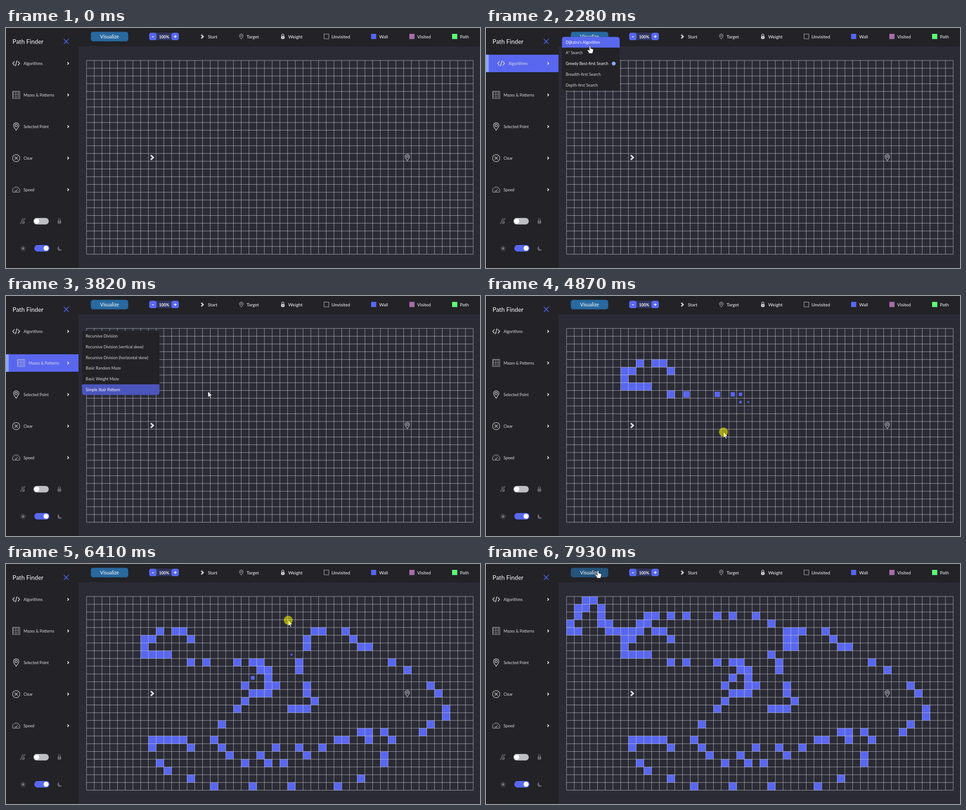
These frames come from a looping animation (1053 px wide and 532 px high, 8000 ms). An HTML page:

```html
<!DOCTYPE html>
<html lang="en">
<head>
<meta charset="utf-8">
<title>Path Finder</title>
<style>
  html, body { margin: 0; width: 100%; height: 100%; overflow: hidden; background: #2b2b36; }
  svg { display: block; width: 1053px; height: 532px; }
  text { font-family: Lato, sans-serif; font-size: 8.89px; fill: #dededf; }
  .title { font-size: 13.6px; fill: #fff; }
  .legend { font-size: 10px; fill: #fff; }
  .btn { font-size: 10.9px; fill: #fff; text-anchor: middle; }
  .zoom { font-weight: 700; fill: #fff; text-anchor: middle; }
  .line { fill: none; stroke: #d0d0d3; stroke-width: 1.25; }
  .dim { color: #6b6b72; }
  .blue { fill: #5967ef; }
  .panel { fill: #222227; }
</style>
</head>
<body>
<svg viewBox="0 0 1053 532">
  <defs>
    <path id="chev" d="M-1.6-2.8 1.3 0-1.6 2.8" fill="none" stroke="#e8e8ea" stroke-width="1.8"/>
    <g id="pin" class="line">
      <path d="M0 8.3C-1.6 4.6-6 1.6-6-2.4a6 6 0 0 1 12 0C6 1.6 1.6 4.6 0 8.3z"/>
      <circle cy="-2.4" r="2.7"/>
    </g>
    <g id="code" class="line" style="stroke-width:1.6">
      <path d="M-3.6-4.6-7.7 0l4.1 4.6M3.6-4.6 7.7 0 3.6 4.6M1.7-6.3-1.7 6.3"/>
    </g>
    <g id="maze" class="line" style="stroke-width:.8">
      <path d="M-8-8H8V8H-8z"/>
      <path d="M-8-5H8M-8-2H8M-8 1H8M-8 4.5H8" stroke-dasharray="3.4 2.1"/>
      <path d="M-5-8V8M-2-8V8M1.5-8V8M5-8V8" stroke-dasharray="2.3 3.4"/>
    </g>
    <g id="clear" class="line" style="stroke-width:1.15">
      <circle r="8"/><path d="M-3.4-3.4 3.4 3.4M3.4-3.4-3.4 3.4"/>
    </g>
    <g id="speed" class="line" style="stroke-width:.9">
      <path d="M-7.4 5.5A8.2 8.2 0 1 1 7.4 5.5zM-1 3.4 4-2M-5.5 1.8h1.4M-3.8-2.2l.9.9M0-4v1.3M4 1.8h1.5"/>
      <circle cx="-.6" cy="3" r="1"/>
    </g>
    <g id="lock" fill="currentColor">
      <rect x="-4" y="-1.3" width="8" height="7" rx="2.6"/>
      <path d="M-2.5-1v-1.8a2.5 2.5 0 0 1 5 0V-1" fill="none" stroke="currentColor" stroke-width="1.2"/>
      <circle cy="1.9" r=".9" fill="#222227"/>
    </g>
    <path id="arrow" d="M0 0v13.2l3.1-2.9 2.1 4.8 2.2-.9-2.1-4.7h4.2z"/>
    <path id="hand" d="M-1.6 1.4a1.5 1.5 0 0 1 3 0V5.8l4.3 1.1a2 2 0 0 1 1.6 2l-.5 3.8-1.5 4.2h-6.8L-5.6 10.6a1.4 1.4 0 0 1 2-1.8l2 1.7z"/>
  </defs>

  <rect width="1053" height="532" fill="#2b2b36"/>
  <rect class="panel" width="1053" height="41"/>
  <rect class="panel" width="161" height="532"/>

  <g id="walls" class="blue"></g>
  <path id="grid" fill="none" stroke="#e6e6ec" stroke-width=".62"/>
  <path d="M321.7 282 327 287l-5.3 5" fill="none" stroke="#dcdce0" stroke-width="3.6"/>
  <use href="#pin" transform="translate(891.5 287) scale(.83)"/>

  <rect id="run" x="188.5" y="8.5" width="83" height="21" rx="5"/>
  <text class="btn" x="230" y="23">Visualize</text>
  <rect x="318" y="10.5" width="66" height="16.5" rx="4.5" fill="#30355f"/>
  <rect class="blue" x="318" y="10.5" width="16.5" height="16.5" rx="4.5"/>
  <rect class="blue" x="367.5" y="10.5" width="16.5" height="16.5" rx="4.5"/>
  <text class="zoom" x="351.3" y="22.6">100%</text>
  <path d="M324.3 19.5h4M372.8 19h6.4M376 15.8v6.4" stroke="#fff" stroke-width="1.3"/>

  <path d="M433.8 15 438 19l-4.2 4" fill="none" stroke="#dcdce0" stroke-width="2.7"/>
  <use href="#pin" transform="translate(522.7 19) scale(.7)"/>
  <use href="#lock" x="615" y="18.7" color="#d0d0d3"/>
  <rect x="706.5" y="13.5" width="10.5" height="10.5" fill="none" stroke="#d8d8dc" stroke-width=".8"/>
  <rect class="blue" x="811" y="13" width="11.5" height="11.5"/>
  <rect x="896" y="13" width="11.5" height="11.5" fill="#a76ea6"/>
  <rect x="991" y="13" width="11.5" height="11.5" fill="#5ff77a"/>
  <g class="legend">
    <text class="legend" x="448.5" y="22.6">Start</text>
    <text class="legend" x="534.5" y="22.6">Target</text>
    <text class="legend" x="627" y="22.6">Weight</text>
    <text class="legend" x="723" y="22.6">Unvisited</text>
    <text class="legend" x="829" y="22.6">Wall</text>
    <text class="legend" x="913.5" y="22.6">Visited</text>
    <text class="legend" x="1008.5" y="22.6">Path</text>
  </g>

  <text class="title" x="14.5" y="35">Path Finder</text>
  <path d="M128.5 24.5l10.6 10.6m0-10.6-10.6 10.6" stroke="#5567f5" stroke-width="1.6"/>
  <g id="side"></g>

  <g class="dim">
    <use href="#lock" x="37.5" y="428"/>
    <path d="M31 435 43.5 421.5" stroke="#222227" stroke-width="3.4"/>
    <path d="M31 434 43 421.5" stroke="currentColor" stroke-width="1.8"/>
    <use href="#lock" x="118.7" y="428"/>
    <circle cx="38" cy="488.7" r="3.2" fill="currentColor"/>
    <circle cx="38" cy="488.7" r="5.5" fill="none" stroke="currentColor" stroke-width="2" stroke-dasharray="1.3 3.02"/>
    <path d="M118.6 483.2a5.4 5.4 0 1 0 6.2 7.3 4.9 4.9 0 0 1-6.2-7.3z" fill="currentColor"/>
  </g>
  <rect x="61" y="421" width="34" height="14.5" rx="7.2" fill="#bdbec4"/>
  <circle cx="68.3" cy="428.2" r="5.6" fill="#fff"/>
  <rect class="blue" x="63" y="481" width="33.5" height="14.5" rx="7.2"/>
  <circle cx="89" cy="488.2" r="5.6" fill="#fff"/>

  <g id="menus"></g>
  <g id="cursor">
    <use id="shape" fill="#fff" stroke="#16161c" stroke-width=".8"/>
    <circle id="press" r="10" fill="#ff0" opacity=".53"/>
  </g>
</svg>

<script>
const LOOP = 8000, FRAME = 70;
const SHOW = 180, PICK = 2340, RUN = 7400;   // pointer appears, algorithm chosen, button reached
const COLS = 50, ROWS = 25, CELL = 17.18, LEFT = 178.9, TOP = 72;
const ITEM = 23.75;

const $ = id => document.getElementById(id);
const set = (el, attrs) => { for (const k in attrs) el.setAttribute(k, attrs[k]); };
function add(parent, tag, attrs = {}, label) {
  const el = document.createElementNS("http://www.w3.org/2000/svg", tag);
  set(el, attrs);
  if (label) el.textContent = label;
  return parent.appendChild(el);
}
const clamp = v => Math.min(1, Math.max(0, v));
const lerp = (a, b, k) => a + (b - a) * k;

// strength of a hover that fades in from a and out from b
const fade = (t, a, b, d) =>
  t < b ? clamp((t - a) / d) : clamp(Math.min(1, (b - a) / d) - (t - b) / d);

// ---- grid
let lines = "";
for (let i = 0; i <= COLS; i++) lines += `M${LEFT + i * CELL} ${TOP}v${ROWS * CELL}`;
for (let i = 0; i <= ROWS; i++) lines += `M${LEFT} ${TOP + i * CELL}h${COLS * CELL}`;
$("grid").setAttribute("d", lines);

// ---- drawing walls: the mouse is read at an even rate along straight legs
// [column, row, readings], and each reading marks the cell below it
const drag = [];
function sweep(from, to, legs) {
  const path = [];
  let [x, y] = legs[0];
  if (!drag.length) path.push({ x, y });
  else ({ x, y } = drag.at(-1));
  for (const [x2, y2, n = 1] of legs) {
    for (let i = 1; i <= n; i++) path.push({ x: lerp(x, x2, i / n), y: lerp(y, y2, i / n) });
    [x, y] = [x2, y2];
  }
  path.forEach((p, i) => drag.push({ ...p, t: lerp(from, to, i / (path.length - 1)) }));
}
// upper left
sweep(4540, 4865, [[13.4, 4.6], [9.4, 4, 3], [7, 5.4, 2], [7, 7, 2], [10, 7, 3], [15, 8, 2],
  [19, 8], [22.3, 8, 2], [23, 12, 6], [20, 12.6, 4]]);
// slowly along the middle
sweep(4900, 5560, [[15.6, 18, 3], [18, 20.4, 2], [25, 21, 3], [28, 20], [35, 16.7, 4],
  [39, 17.7, 3], [37.6, 21.4, 2]]);
// around the bottom, up the right side and back inwards
sweep(5590, 6230, [[31.5, 24, 2], [16, 24, 3], [10, 22, 2], [8, 19, 2], [8, 18], [13, 18.6, 5],
  [21.9, 19.8], [27, 19, 2], [36, 18], [42.6, 17], [46, 15, 2], [46, 13.8], [43.9, 10.9, 2],
  [39, 8, 2], [36, 6.4], [33, 4, 3], [30, 3.8], [28, 5, 2], [27, 9, 3], [28, 11],
  [28.9, 13.2, 2], [26, 14.4, 3], [24, 11], [21, 12], [20, 11]]);
// out to the top
sweep(6275, 6405, [[21, 10], [26, 7], [29, 6], [29, 5], [26, 2.7, 2]]);
// along the top to the corner
sweep(6430, 6920, [[23.9, 2], [19, 2, 2], [15, 2], [11, 2, 2], [8, 4, 5], [4.8, 4, 3],
  [4, .8, 5], [2.4, 0, 2], [.1, 3, 5], [.8, 4, 2]]);

const toX = c => LEFT + (c + .5) * CELL, toY = r => TOP + (r + .5) * CELL;
const cells = new Map();
for (const p of drag) {
  const c = Math.round(p.x), r = Math.round(p.y), key = c + "," + r;
  if (!cells.has(key)) cells.set(key, { t: p.t, x: toX(c), y: toY(r), el: add($("walls"), "rect") });
}
const grow = age => CELL * clamp((age - 70) / 110) ** 1.4;

// ---- pointer: [time, x, y]
const track = [
  [SHOW, 905, 455], [950, 262, 130], [1120, 150, 85], [1330, 172, 78], [1880, 228, 43],
  [2010, 231, 39.5], [2960, 231, 39.5], [3190, 207, 81.5], [3400, 138, 150], [3590, 205, 198],
  [3790, 335, 209], [3820, 448.7, 211.5], [4200, 440, 195],
  ...drag.map(p => [p.t, toX(p.x), toY(p.y)]),
  [7180, 220, 60], [7450, 228, 22], [7880, 249, 14.5]
];
function pointAt(t) {
  const i = track.findIndex(k => k[0] > t);
  if (i < 1) return track.at(i).slice(1);
  const [a, b] = [track[i - 1], track[i]], k = (t - a[0]) / (b[0] - a[0]);
  return [lerp(a[1], b[1], k), lerp(a[2], b[2], k)];
}

// ---- sidebar
const sideRows = [["Algorithms", "code", 1090, 3335], ["Mazes & Patterns", "maze", 3335, 3955],
                  ["Selected Point", "pin"], ["Clear", "clear"], ["Speed", "speed"]]
  .map(([name, icon, from, to], i) => {
    const g = add($("side"), "g", { transform: `translate(0 ${78.4 + 70 * i})` });
    const glow = add(g, "g", { opacity: 0 });
    add(glow, "rect", { y: -19.2, width: 161, height: 38.7, class: "blue" });
    add(glow, "rect", { y: -19.2, width: 6, height: 38.7, fill: "#8ea6ff" });
    const body = add(g, "g");
    add(body, "use", { href: "#" + icon, x: 22.6 });
    add(body, "text", { x: 39, y: 3.4 }, name);
    add(g, "use", { href: "#chev", x: 138 });
    return { glow, body, from, to };
  });

// ---- menus
const X0 = 168.5;
const inMenu = (m, x, y) => x > X0 && x < X0 + m.w && y > m.y && y < m.y + m.h;

function menu(side, y, w, names) {
  const { from, to } = side, h = ITEM * names.length, id = "clip" + y;
  const g = add($("menus"), "g", { transform: `translate(${X0} ${y})` });
  add(add(g, "clipPath", { id }), "rect", { width: w, height: h, rx: 6 });
  const inner = add(g, "g", { "clip-path": `url(#${id})` });
  add(inner, "rect", { width: w, height: h, class: "panel" });
  const rows = names.map((name, i) => ({
    spans: [],
    bar: add(inner, "rect", { y: i * ITEM, width: w, height: ITEM + .3, class: "blue" }),
    label: add(inner, "text", { x: 8.5, y: i * ITEM + 15.2 }, name)
  }));
  const m = { inner, g, rows, from, to, y, w, h };

  // follow the pointer to find when each item is hovered
  let span, over = null;
  for (let t = from; t < to; t += 5) {
    const [px, py] = pointAt(t);
    const row = inMenu(m, px, py) ? rows[Math.floor((py - y) / ITEM)] : null;
    if (row && row !== over) row.spans.push(span = [t, t]);
    if (row) span[1] = t + 5;
    over = row;
  }
  return m;
}
const menus = [
  menu(sideRows[0], 19.4, 128.5, ["Dijkstra's Algorithm", "A* Search", "Greedy Best-first Search",
    "Breadth-first Search", "Depth-first Search"]),
  menu(sideRows[1], 77, 172.5, ["Recursive Division", "Recursive Division (vertical skew)",
    "Recursive Division (horizontal skew)", "Basic Random Maze", "Basic Weight Maze", "Simple Stair Pattern"])
];
const dot = add(menus[0].inner, "circle", { cx: 115.2, r: 4.3, fill: "#90a7fc" });

function draw(t) {
  for (const r of sideRows) {
    const k = r.from ? fade(t, r.from, r.to, 140) : 0;
    r.glow.setAttribute("opacity", k);
    r.body.setAttribute("transform", `translate(${11 * k} 0)`);
  }

  const picked = t < PICK ? 2 : 0;
  const open = menus.find(m => t >= m.from && t < m.to);
  for (const m of menus) {
    m.g.style.display = m === open ? "" : "none";
    m.rows.forEach((r, i) => {
      const k = Math.max(0, ...r.spans.map(([a, b]) => fade(t, a, b, 250)));
      r.bar.setAttribute("opacity", k);
      r.label.style.fill = k > .5 || (m === menus[0] && i === picked) ? "#fff" : "#d6d6d9";
    });
  }
  dot.setAttribute("cy", ITEM * (picked + .5));

  for (const c of cells.values()) {
    const s = grow(t - c.t);
    set(c.el, { x: c.x - s / 2, y: c.y - s / 2, width: s, height: s });
  }

  const k = clamp((t - RUN) / 200);
  $("run").setAttribute("fill", `rgb(${lerp(40, 36, k)},${lerp(105, 84, k)},${lerp(159, 124, k)})`);

  const [x, y] = pointAt(t);
  const hand = x < 161 || t >= RUN || (open && inMenu(open, x, y));
  $("cursor").style.display = t < SHOW ? "none" : "";
  $("cursor").setAttribute("transform", `translate(${x} ${y})`);
  $("shape").setAttribute("href", hand ? "#hand" : "#arrow");
  $("press").style.display = t >= drag[0].t && t < drag.at(-1).t ? "" : "none";
}

const hold = t => t < SHOW - 8 ? 0 : SHOW + FRAME * Math.floor((t + 8 - SHOW) / FRAME);

const start = performance.now();
function tick() {
  draw(hold((performance.now() - start) % LOOP));
  requestAnimationFrame(tick);
}
tick();
</script>
</body>
</html>
```
